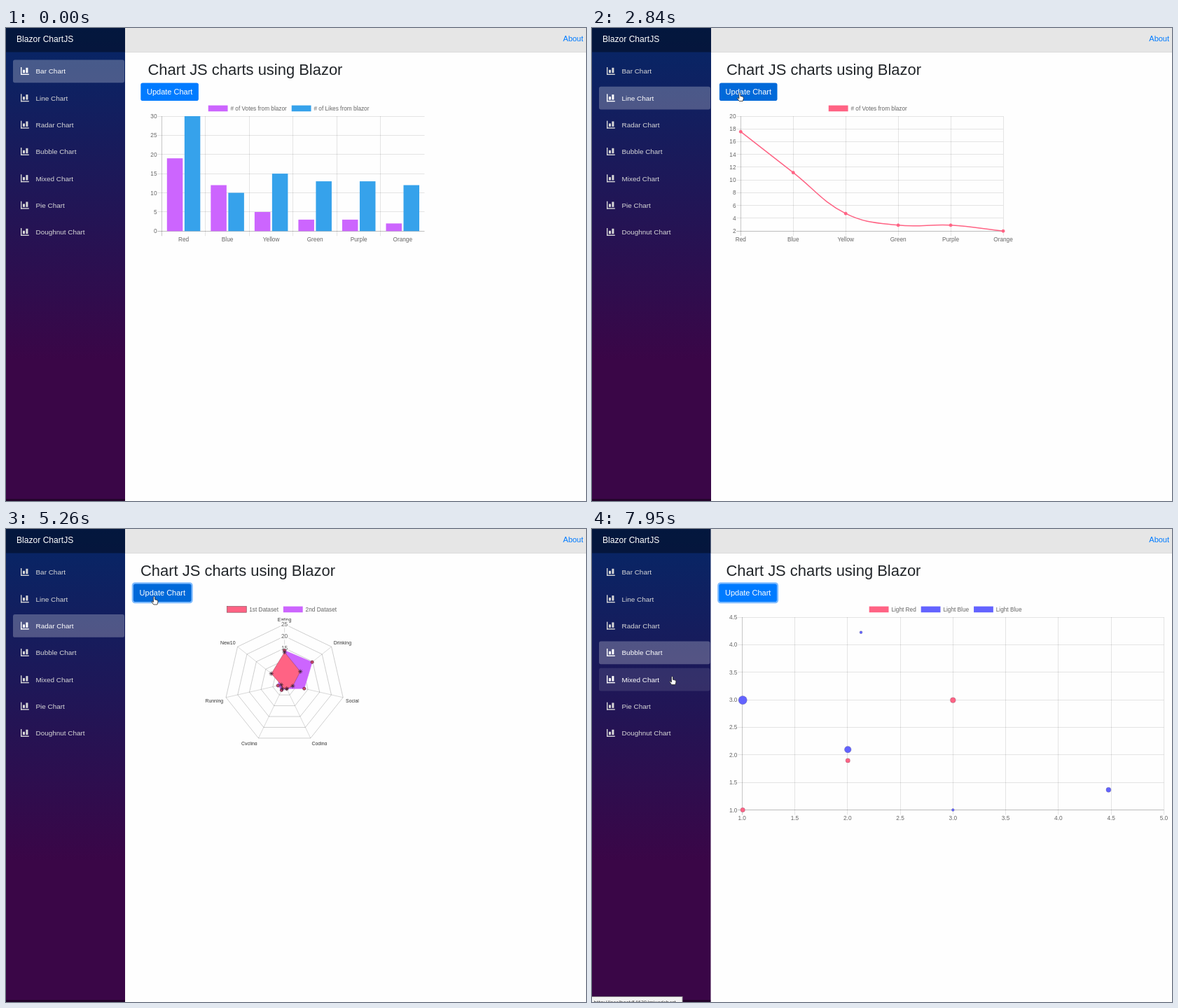
Animation, 828 px wide and 676 px high, one loop 8000 ms. Source, as an HTML page with a canvas:

```html
<!DOCTYPE html>
<html lang="en">
<head>
<meta charset="utf-8">
<title>Blazor ChartJS</title>
<style>
html, body { margin: 0; width: 100%; height: 100%; overflow: hidden; background: #fefefe; }
canvas { display: block; }
</style>
</head>
<body>
<canvas id="stage" width="828" height="676"></canvas>
<script>
const ctx = document.getElementById('stage').getContext('2d');
const LOOP = 8000;
const FONT = '"Liberation Sans", Arial, sans-serif';
const PINK = '#ff6384', VIOLET = '#cc65fe', BLUE = '#36a2eb', INDIGO = '#6363ff';
const NAV = ['Bar', 'Line', 'Radar', 'Bubble', 'Mixed', 'Pie', 'Doughnut'];
const COLORS = ['Red', 'Blue', 'Yellow', 'Green', 'Purple', 'Orange'];
const VOTES = [19, 12, 5, 3, 3, 2];
const LIKES = [30, 10, 15, 13, 13, 12];
const HABITS = ['Eating', 'Drinking', 'Social', 'Coding', 'Cycling', 'Running'];

// Each page: when it opens, when its button is pressed, when the chart redraws
const PAGES = [
  { open: -2000, press: 1360, redraw: 1440, x: 192.3, edge: 170, draw: barChart },
  { open: 2380, press: 3030, redraw: 3119, x: 181.9, edge: 170, draw: lineChart },
  { open: 3860, press: 4930, redraw: 5000, x: 181.9, edge: 170, draw: radarChart },
  { open: 5990, press: 7110, redraw: 7190, x: 181.3, edge: 169.5, draw: bubbleChart }
];
const CLICKS = [1360, 2310, 3030, 3780, 4930, 5920, 7110];

// Pointer rests: arrive time, leave time, x, y
const PATH = [
  [660, 660, 240, 30], [1130, 1900, 213, 92], [2170, 2170, 180, 93],
  [2245, 2420, 143.5, 97], [2850, 3180, 211, 93], [3450, 3900, 140.5, 130],
  [4380, 5300, 211.5, 96.5], [5700, 5750, 135, 160], [5890, 6050, 132, 163],
  [6540, 7480, 213.5, 92], [7860, 8000, 114.5, 211]
];
// Status bubble: show, hide, width, page
const STATUS = [
  [2200, 2440, 120, 'linechart'], [3500, 3920, 125, 'radarchart'],
  [5640, 6060, 133, 'bubblechart'], [7800, 8000, 129, 'mixedchart']
];

const clamp = v => Math.max(0, Math.min(1, v));
const mix = (a, b, k) => a + (b - a) * k;
const smooth = k => k * k * (3 - 2 * k);
const outQuart = k => 1 - (1 - clamp(k)) ** 4;
const snap = v => Math.floor(v) + 0.5;

function text(s, x, y, size, color, align = 'left', base = 'alphabetic') {
  ctx.font = size + 'px ' + FONT;
  ctx.fillStyle = color;
  ctx.textAlign = align;
  ctx.textBaseline = base;
  ctx.fillText(s, x, y);
}
const label = (s, x, y, align = 'center') => text(s, x, y + 3, 8.28, '#666', align);

function rect(x, y, w, h, color) {
  ctx.fillStyle = color;
  ctx.fillRect(x, y, w, h);
}
function round(x, y, w, h, r, color) {
  ctx.beginPath();
  ctx.roundRect(x, y, w, h, r);
  ctx.fillStyle = color;
  ctx.fill();
}
function line(x1, y1, x2, y2, alpha) {
  ctx.beginPath();
  ctx.moveTo(x1, y1);
  ctx.lineTo(x2, y2);
  ctx.lineWidth = 1;
  ctx.strokeStyle = `rgba(0,0,0,${alpha})`;
  ctx.stroke();
}
function dot(x, y, r, fill, edge, width = 0.7) {
  ctx.beginPath();
  ctx.arc(x, y, Math.max(0, r), 0, 7);
  ctx.fillStyle = fill;
  ctx.fill();
  if (edge) {
    ctx.lineWidth = width;
    ctx.strokeStyle = edge;
    ctx.stroke();
  }
}
function poly(points) {
  ctx.beginPath();
  points.forEach(p => ctx.lineTo(p[0], p[1]));
  ctx.closePath();
}

function legend(center, items) {
  ctx.font = '8.28px ' + FONT;
  const widths = items.map(i => 31.7 + ctx.measureText(i[0]).width);
  let x = center - (widths.reduce((a, b) => a + b) + 6.9 * (items.length - 1)) / 2;
  items.forEach(([name, color, edge], i) => {
    rect(x, 110.6, 27.8, 8.6, color);
    if (edge) {
      ctx.strokeStyle = edge;
      ctx.lineWidth = 0.7;
      ctx.strokeRect(x, 110.6, 27.8, 8.6);
    }
    label(name, x + 31.7, 115, 'left');
    x += widths[i] + 6.9;
  });
}

function gridRows(left, right, top, bottom, min, max, step, digits = 0) {
  const n = Math.round((max - min) / step);
  for (let i = 0; i <= n; i++) {
    const y = mix(bottom, top, i / n);
    line(left - 6, snap(y), right, snap(y), i ? 0.1 : 0.26);
    label((min + i * step).toFixed(digits), left - 6.8, y, 'right');
  }
}
function gridCol(x, top, bottom, first) {
  line(snap(x), top, snap(x), bottom + 7, first ? 0.22 : 0.1);
}

function barChart(k, updated) {
  const left = 222.3, right = updated ? 600.8 : 597.5, base = 290.3, top = 126;
  const names = updated ? [...COLORS, 'New7'] : COLORS;
  const votes = updated ? [...VOTES, 7] : VOTES;
  const w = (right - left) / names.length;
  legend(403.6, [['# of Votes from blazor', VIOLET], ['# of Likes from blazor', BLUE]]);
  gridRows(left, right, top, base, 0, 30, 5);
  names.forEach((name, i) => {
    const x = left + i * w;
    gridCol(x, top, base, !i);
    label(name, x + w / 2, 301.5);
  });
  [[votes, VIOLET], [LIKES, BLUE]].forEach(([data, color], s) => data.forEach((v, i) => {
    const h = (base - top) * v / 30 * k;
    rect(left + w * (i + 0.12 + 0.4 * s), base - h, w * 0.36, h, color);
  }));
}

function lineChart(k, updated) {
  const left = 212.3, right = updated ? 590 : 587, base = 290.2, top = 126;
  const names = updated ? [...COLORS, 'New8'] : COLORS;
  const data = updated ? [...VOTES, 8] : VOTES;
  const w = (right - left) / (names.length - 1);
  legend(393.8, [['# of Votes from blazor', PINK]]);
  gridRows(left, right, top, base, 2, 20, 2);
  names.forEach((name, i) => {
    gridCol(left + i * w, top, base, !i);
    label(name, left + i * w, 301.5);
  });
  const pts = data.map((v, i) => [left + i * w, base - (base - top) * (v - 2) / 18 * k]);
  // Spline handles with tension 0.4, kept inside the plot
  const handles = pts.map((p, i) => {
    const a = pts[i - 1] || p, b = pts[i + 1] || p;
    const d1 = Math.hypot(p[0] - a[0], p[1] - a[1]);
    const d2 = Math.hypot(b[0] - p[0], b[1] - p[1]);
    const at = f => [p[0] + f * (b[0] - a[0]),
      Math.max(top, Math.min(base, p[1] + f * (b[1] - a[1])))];
    return [at(-0.4 * d1 / (d1 + d2)), at(0.4 * d2 / (d1 + d2))];
  });
  ctx.beginPath();
  ctx.moveTo(...pts[0]);
  for (let i = 1; i < pts.length; i++)
    ctx.bezierCurveTo(...handles[i - 1][1], ...handles[i][0], ...pts[i]);
  ctx.strokeStyle = PINK;
  ctx.lineWidth = 1.5;
  ctx.stroke();
  pts.forEach(p => dot(p[0], p[1], 2.1, PINK, PINK));
}

function star(x, y) {
  ctx.beginPath();
  for (let i = 0; i < 4; i++) {
    const dx = 3.1 * Math.cos(i * Math.PI / 4), dy = 3.1 * Math.sin(i * Math.PI / 4);
    ctx.moveTo(x - dx, y - dy);
    ctx.lineTo(x + dx, y + dy);
  }
  ctx.strokeStyle = '#3a2030';
  ctx.lineWidth = 0.8;
  ctx.stroke();
}

function radarChart(k, updated) {
  const names = updated ? [...HABITS, 'New10'] : HABITS;
  const n = names.length, max = updated ? 25 : 20;
  const cx = 397.6, cy = updated ? 221.7 : 217.5, r = updated ? 85.7 : 81.5;
  const dir = i => [Math.sin(i * 2 * Math.PI / n), -Math.cos(i * 2 * Math.PI / n)];
  const at = (i, d) => [cx + dir(i)[0] * d, cy + dir(i)[1] * d];
  const first = ['1st Dataset', PINK, '#8a5560'];
  legend(393.8, updated ? [first, ['2nd Dataset', VIOLET]] : [first]);

  ctx.save();
  ctx.beginPath();
  ctx.rect(170, 120, 440, 189);
  ctx.clip();
  ctx.lineWidth = 0.7;
  ctx.strokeStyle = 'rgba(0,0,0,.27)';
  for (let v = 5; v <= max; v += 5) {
    poly(names.map((_, i) => at(i, r * v / max)));
    ctx.stroke();
  }
  names.forEach((name, i) => {
    line(cx, cy, ...at(i, r), 0.15);
    const [x, y] = at(i, r + 4), dx = dir(i)[0];
    const align = Math.abs(dx) < 0.01 ? 'center' : dx > 0 ? 'left' : 'right';
    text(name, x, y + (dir(i)[1] < 0 ? -0.4 : 6), 6.9, '#333', align);
  });
  for (let v = 5; v <= max; v += 5) {
    const y = cy - r * v / max;
    rect(cx - 6, y - 5.5, 12, 11, 'rgba(255,255,255,.75)');
    label(String(v), cx, y);
  }
  const area = (data, color, edge, mark) => {
    const pts = data.map((v, i) => at(i, r * v / max * k));
    poly(pts);
    ctx.fillStyle = color;
    ctx.fill();
    ctx.strokeStyle = edge;
    ctx.lineWidth = 0.7;
    ctx.stroke();
    pts.forEach(p => mark(...p));
  };
  if (updated)
    area([20, 21, 12, 3, 4, 4], VIOLET, VIOLET, (x, y) => dot(x, y, 2.1, '#d04a6c', '#5a2040'));
  area(updated ? [...VOTES, 10] : VOTES, PINK, 'rgba(70,40,50,.45)', star);
  ctx.restore();
}

function bubbleChart(k, updated) {
  const left = 214.2, right = 816.4, top = 126, base = 401.5;
  const maxX = updated ? 5 : 3, maxY = updated ? 4.5 : 3, step = updated ? 0.5 : 0.2;
  const items = [['Light Red', PINK], ['Light Blue', INDIGO]];
  legend(504.6, updated ? [...items, items[1]] : items);
  gridRows(left, right, top, base, 1, maxY, step, 1);
  const n = Math.round((maxX - 1) / step);
  for (let i = 0; i <= n; i++) {
    const x = mix(left, right, i / n);
    gridCol(x, top, base, !i);
    label((1 + i * step).toFixed(1), x, 413);
  }
  const bubbles = (color, data) => data.forEach(([x, y, r]) => {
    const px = mix(left, right, (x - 1) / (maxX - 1));
    const py = mix(base, top, (y - 1) / (maxY - 1));
    dot(mix((left + right) / 2, px, k), mix(base, py, k), r * k, color, 'rgba(90,90,110,.4)');
  });
  if (updated) bubbles(INDIGO, [[2.125, 4.235, 2], [4.48, 1.365, 3.5]]);
  bubbles(INDIGO, [[1, 3, 6.1], [2, 2.1, 4.8], [3, 1, 1.9]]);
  bubbles(PINK, [[1, 1, 3.2], [2, 1.9, 3.2], [3, 3, 3.9]]);
}

function pointer(t) {
  let i = PATH.length - 1;
  while (i && t < PATH[i][0]) i--;
  const a = PATH[i], b = PATH[i + 1];
  if (!b || t <= a[1]) return [a[2], a[3]];
  const k = smooth(clamp((t - a[1]) / (b[0] - a[1])));
  return [mix(a[2], b[2], k), mix(a[3], b[3], k)];
}
const pageAt = t => PAGES.filter(p => t >= p.open).length - 1;
function overButton(t) {
  if (t < 660) return false;
  const [x, y] = pointer(t), left = PAGES[pageAt(t)].x;
  return x > left && x < left + 82.6 && y > 78.4 && y < 104;
}
function overNav(t) {
  const [x, y] = pointer(t);
  return t < 660 || x < 10 || x > 159 ? -1
    : NAV.findIndex((_, i) => y > 45.4 + 38.33 * i && y < 78.2 + 38.33 * i);
}

function sidebar(t, active, edge) {
  const g = ctx.createLinearGradient(0, 0, 0, 676);
  g.addColorStop(0, 'rgb(5,39,103)');
  g.addColorStop(0.7, '#3a0647');
  rect(0, 0, edge, 676, g);
  rect(0, 0, edge, 34.5, 'rgba(0,0,0,.4)');
  rect(0, 673, edge, 3, 'rgba(0,0,0,.4)');
  text('Blazor ChartJS', 15, 19.8, 12.1, '#fff');
  const hover = overNav(t);
  NAV.forEach((name, i) => {
    const y = 45.4 + 38.33 * i, lit = i === active || i === hover;
    if (lit) round(10, y, edge - 11, 32.8, 2.7, `rgba(255,255,255,${i === active ? 0.25 : 0.1})`);
    const color = lit ? '#fff' : '#d7d7d7';
    rect(21, y + 10.6, 1.4, 11, color);
    rect(21, y + 20.2, 11.8, 1.4, color);
    rect(24, y + 14.4, 3, 4.4, color);
    rect(28.4, y + 11.4, 3, 7.4, color);
    text(name + ' Chart', 42.5, y + 19.9, 9.93, color);
  });
}

function button(t, page) {
  const { x, press } = page;
  const ring = clamp((t - press - 50) / 120);
  if (ring) round(x - 2.2, 76.2, 87, 30, 4.5, `rgba(0,123,255,${0.5 * ring})`);
  // Averaging the last 150 ms gives the colour transition
  let h = 0;
  for (let i = 0; i < 10; i++) h += overButton(t - 15 * i) / 10;
  round(x, 78.4, 82.6, 25.6, 2.8, `rgb(0,${mix(123, 105, h)},${mix(255, 217, h)})`);
  text('Update Chart', x + 8.7, 95.2, 11, '#fff');
}

function status(t) {
  for (const [from, to, w, path] of STATUS) {
    if (t < from || t >= to) continue;
    ctx.globalAlpha = clamp((t - from) / 110);
    rect(0, 668, w + 0.5, 8, '#9a9a9a');
    rect(0, 669, w - 0.5, 7, '#f3f3f3');
    ctx.font = '7.4px "Open Sans", "Noto Sans", sans-serif';
    ctx.fillStyle = '#333';
    ctx.textAlign = 'left';
    ctx.fillText('http://localhost:54639/' + path, 2.5, 679);
    ctx.globalAlpha = 1;
  }
}

function cursor(t) {
  if (t < 660) return;
  const [x, y] = pointer(t);
  const click = CLICKS.find(c => t >= c && t < c + 250);
  if (click !== undefined) {
    ctx.globalAlpha = 0.75 * (1 - ((t - click) / 250) ** 2);
    dot(x, y + 1, 8, '#d8d21c');
    ctx.globalAlpha = 1;
  }
  ctx.save();
  ctx.translate(x, y);
  if (overButton(t) || overNav(t) >= 0) {
    poly([[-1.1, 0.5], [0, -0.3], [1, 0.5], [1, 4.3], [5, 5.3], [5.5, 7.5], [4.4, 11.5],
      [-0.8, 11.5], [-3.6, 7.6], [-3, 6.6], [-1.1, 8]]);
  } else if (x > 190 && y > 46 && y < 75) {
    rect(-0.5, -5, 1, 10, '#222');
    rect(-2.5, -5.5, 5, 1, '#222');
    rect(-2.5, 4.5, 5, 1, '#222');
    ctx.beginPath();
  } else {
    poly([[0, 0], [0, 10], [2.3, 8], [3.8, 11.3], [5.2, 10.6], [3.8, 7.5], [7, 7.3]]);
  }
  ctx.fillStyle = '#fff';
  ctx.fill();
  ctx.strokeStyle = '#222';
  ctx.lineWidth = 0.8;
  ctx.stroke();
  ctx.restore();
}

function render(t) {
  const active = pageAt(t), page = PAGES[active];
  rect(0, 0, 828, 676, '#fefefe');
  rect(page.edge, 0, 828 - page.edge, 34, '#e6e6e6');
  rect(page.edge, 34, 828 - page.edge, 0.8, '#d2d2d2');
  text('About', 795.3, 18.6, 11, '#007bff');
  text('Chart JS charts using Blazor', page.x + 10.1, 67.4, 21.95, '#212529');
  const updated = t >= page.redraw;
  page.draw(outQuart((t - (updated ? page.redraw : page.open)) / 1000), updated);
  sidebar(t, active, page.edge);
  button(t, page);
  status(t);
  cursor(t);
}

function tick() {
  render(performance.now() % LOOP);
  requestAnimationFrame(tick);
}
tick();
</script>
</body>
</html>
```
